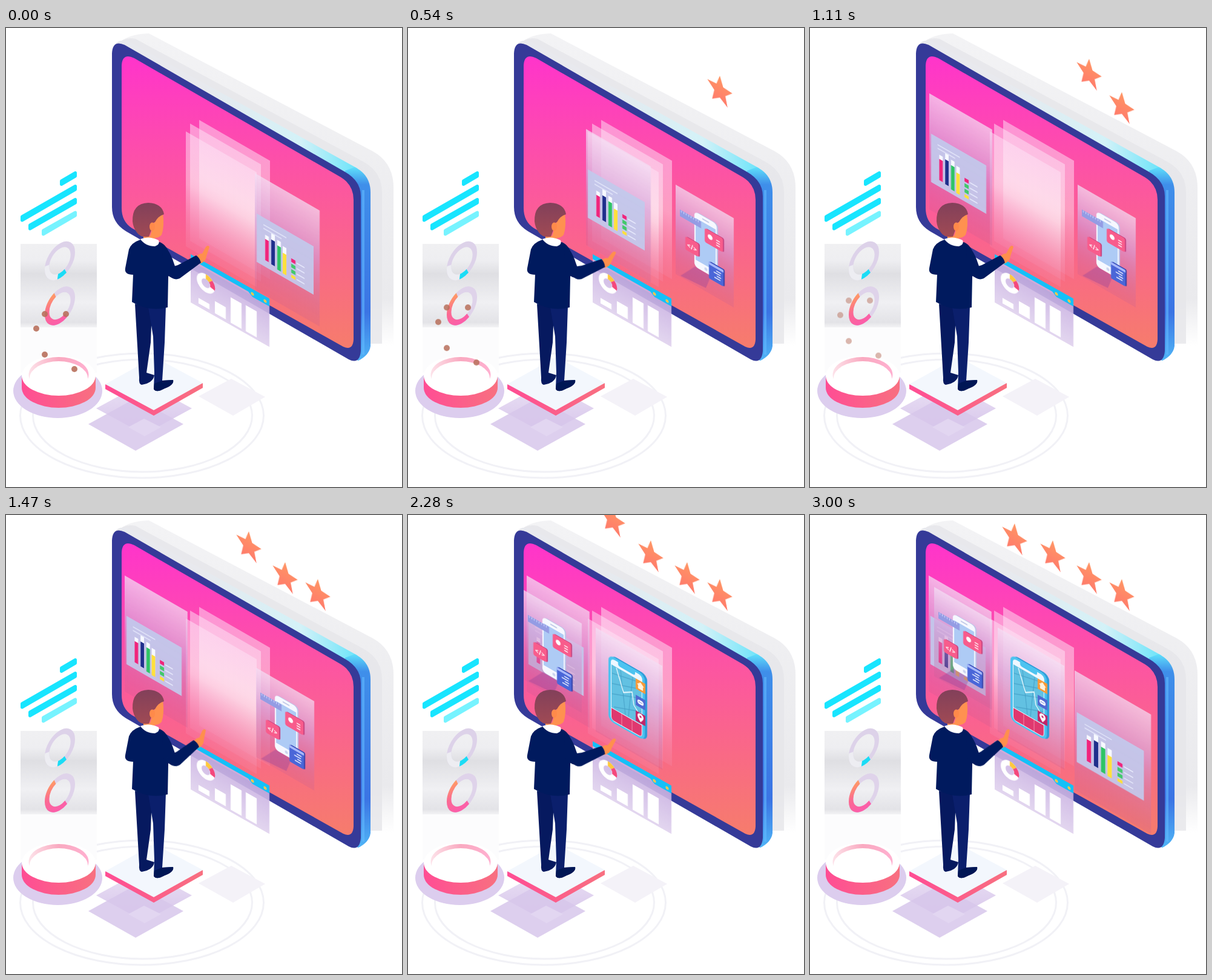
An HTML page for the animation above (3030 ms loop, 654 by 759 pixels).

```html
<!DOCTYPE html>
<html lang="en">
<head>
<meta charset="utf-8">
<title>Isometric dashboard</title>
<style>
  html, body { margin: 0; width: 100%; height: 100%; overflow: hidden; background: #fff; }
  svg { display: block; width: 654px; height: 759px; }
  .move { animation: 3030ms linear infinite; }
  .chart { animation-name: chart; }
  .app { animation-name: app; }
  .phone { animation-name: phone; }
  .next { animation-name: next; }
  .arm { animation-name: arm; transform-origin: 280px 412px; animation-timing-function: ease-in-out; }
  .dots { animation-name: dots; }
  .hop { animation: hop 3030ms var(--s) infinite; }
  .s1 { animation-name: show1; }
  .s2 { animation-name: show2; }
  .s3 { animation-name: show3; }
  .s4 { animation-name: show4; }

  @keyframes chart {
    0% { transform: translate(411px, 240px) skewY(30deg) scaleX(1); animation-timing-function: ease-in-out; }
    14%, 20.5% { transform: translate(294px, 167px) skewY(30deg) scaleX(1); animation-timing-function: ease-in-out; }
    34%, 36.7% { transform: translate(197px, 108px) skewY(30deg) scaleX(.97); }
    43%, 100% { transform: translate(196px, 100px) skewY(30deg) scaleX(.97); }
  }
  @keyframes app {
    0%, 6% { transform: translate(442px, 259px) skewY(30deg); opacity: 0; }
    13% { opacity: 1; }
    45.5% { transform: translate(442px, 259px) skewY(30deg); animation-timing-function: ease-in; }
    48.5% { transform: translate(414px, 253px) skewY(30deg); animation-timing-function: ease-out; }
    57%, 63.5% { transform: translate(316px, 198px) skewY(30deg); animation-timing-function: ease-in-out; }
    75.2% { transform: translate(191px, 124px) skewY(30deg); animation-timing-function: ease-in-out; }
    84%, 100% { transform: translate(205px, 119px) skewY(30deg); opacity: 1; }
  }
  @keyframes phone {
    0%, 55% { transform: translate(420px, 267px) skewY(30deg); opacity: 0; }
    61% { opacity: 1; }
    63.5% { transform: translate(420px, 267px) skewY(30deg); animation-timing-function: ease-in-out; }
    75%, 100% { transform: translate(310px, 186px) skewY(30deg); opacity: 1; }
  }
  @keyframes next {
    0%, 79% { transform: translate(438px, 263px) skewY(30deg) scale(1); opacity: 0; }
    88%, 100% { transform: translate(437px, 257px) skewY(30deg) scale(1.18, 1.03); opacity: 1; }
  }
  @keyframes arm {
    0%, 36.6%, 62.4% { transform: rotate(0); }
    17.8%, 75.3% { transform: rotate(9.5deg); }
    48.5%, 99%, 100% { transform: rotate(-6.5deg); }
  }
  @keyframes dots {
    0% { transform: none; opacity: .9; }
    20% { opacity: .85; }
    36.6% { opacity: .5; }
    46%, 100% { transform: translateY(-28px); opacity: 0; }
  }
  @keyframes hop {
    0% { transform: none; animation-timing-function: cubic-bezier(.39, .575, .565, 1); }
    9.9% { transform: translateY(-32px); animation-timing-function: cubic-bezier(.47, 0, .745, .715); }
    19.8%, 100% { transform: none; }
  }
  @keyframes show1 { 0%, 4% { opacity: 0; } 6%, 100% { opacity: 1; } }
  @keyframes show2 { 0%, 22% { opacity: 0; } 24%, 100% { opacity: 1; } }
  @keyframes show3 { 0%, 44% { opacity: 0; } 46%, 100% { opacity: 1; } }
  @keyframes show4 { 0%, 59.5% { opacity: 0; } 61.5%, 100% { opacity: 1; } }
</style>
</head>
<body>
<svg viewBox="0 0 654 759">
  <defs>
    <linearGradient id="screen" x2="0" y2="1">
      <stop stop-color="#ff34cb"/><stop offset=".45" stop-color="#fc579f"/><stop offset="1" stop-color="#f67c6c"/>
    </linearGradient>
    <linearGradient id="sheet" x2="0" y2="1">
      <stop stop-color="#fde4f6" stop-opacity=".5"/><stop offset=".45" stop-color="#fff" stop-opacity=".4"/>
      <stop offset="1" stop-color="#f0a6cc" stop-opacity=".14"/>
    </linearGradient>
    <linearGradient id="pane" x2="0" y2="1">
      <stop stop-color="#f3dff4" stop-opacity=".72"/><stop offset=".4" stop-color="#d49fd8" stop-opacity=".68"/>
      <stop offset="1" stop-color="#c05a94" stop-opacity=".2"/>
    </linearGradient>
    <linearGradient id="haze" x2="0" y2="1">
      <stop stop-color="#f0f0f2"/><stop offset=".2" stop-color="#eeeef1"/><stop offset=".36" stop-color="#dfdfe3"/>
      <stop offset=".7" stop-color="#f0f0f3"/><stop offset=".94" stop-color="#e3e3e7"/><stop offset="1" stop-color="#f3f3f5"/>
    </linearGradient>
    <linearGradient id="shade" x2="0" y2="1">
      <stop stop-color="#f3f3f5"/><stop offset=".85" stop-color="#eaeaed"/><stop offset="1" stop-color="#fff"/>
    </linearGradient>
    <linearGradient id="lip">
      <stop offset=".35" stop-color="#e8e9ee"/><stop offset=".75" stop-color="#d3f2f8"/><stop offset="1" stop-color="#5fe2fa"/>
    </linearGradient>
    <linearGradient id="side" x2="0" y2="1">
      <stop stop-color="#5fe0fb"/><stop offset=".09" stop-color="#3f8fea"/><stop offset=".75" stop-color="#3b74e4"/><stop offset="1" stop-color="#4fb4f6"/>
    </linearGradient>
    <linearGradient id="rim"><stop stop-color="#ff4d94"/><stop offset="1" stop-color="#f87080"/></linearGradient>
    <linearGradient id="bowl"><stop stop-color="#fde3ea"/><stop offset=".5" stop-color="#f9a9c0"/><stop offset="1" stop-color="#ffb0d0"/></linearGradient>
    <linearGradient id="lilac" x2="0" y2="1"><stop stop-color="#ebe2f5"/><stop offset="1" stop-color="#d6c4ea"/></linearGradient>
    <linearGradient id="stats" x2="0" y2="1"><stop stop-color="#c9b0e2" stop-opacity=".9"/><stop offset="1" stop-color="#e0d2ee" stop-opacity=".9"/></linearGradient>
    <linearGradient id="star" x2="0" y2="1"><stop stop-color="#ff9664"/><stop offset="1" stop-color="#ff7b6b"/></linearGradient>
    <linearGradient id="arc" x2="0" y2="1"><stop stop-color="#ff9a66"/><stop offset=".5" stop-color="#fb6a92"/><stop offset="1" stop-color="#fb5fa8"/></linearGradient>
    <linearGradient id="hair" x2="0" y2="1"><stop stop-color="#82405a"/><stop offset="1" stop-color="#a04a54"/></linearGradient>

    <polygon id="starShape" fill="url(#star)" transform="matrix(.87 .5 0 1 0 0)"
      points="0,-25 6.500,-9 23.8,-7.7 10.5,3.4 14.7,20.2 0,11 -14.7,20.2 -10.5,3.4 -23.8,-7.7 -6.5,-9"/>

    <g id="chartPane">
      <rect width="107" height="192" fill="url(#pane)"/>
      <rect x="3" y="65" width="94" height="80" fill="#c3c9ec" opacity=".92"/>
      <path d="M14 77h38M14 83h30" stroke="#e6eafc" stroke-width="1.3"/>
      <path d="M17 92h6v42h-6zM27 84h6v50h-6zM37 89h6v45h-6zM46 94h6v40h-6z" fill="#f7f9ff"/>
      <path d="M17 99h6v35h-6z" fill="#f0247c"/>
      <path d="M27 94h6v41h-6z" fill="#1f2f8c"/>
      <path d="M37 98h6v40h-6z" fill="#2fc465"/>
      <path d="M46 105h6v34h-6z" fill="#ffe03c"/>
      <path d="M60 106h7v6h-7z" fill="#f0247c"/>
      <path d="M60 115h7v6h-7zM60 124h7v6h-7z" fill="#42c96c"/>
      <path d="M60 133h7v5h-7z" fill="#ffe03c"/>
      <path d="M69 109h13M69 118h13M69 127h13M69 136h13" stroke="#eef1ff" stroke-width="1.3"/>
    </g>

    <g id="appPane">
      <rect width="96" height="148" fill="url(#pane)"/>
      <path d="M8 146L32 117 58 118 50 142Z" fill="#8e3f9c" opacity=".35"/>
      <rect x="33" y="25" width="37" height="91" rx="6" fill="#b9c3e8"/>
      <rect x="31" y="26" width="37" height="91" rx="6" fill="#f6f8ff"/>
      <rect x="33" y="36" width="33" height="69" fill="#aecbf5"/>
      <path d="M44 31h11" stroke="#c0c9e6" stroke-width="2"/>
      <circle cx="50" cy="111" r="2.5" fill="#ccd4ee"/>
      <rect x="7" y="37" width="35" height="11" fill="#949ce4"/>
      <path d="M9 39h32" stroke="#dfe3ff" stroke-width="3" stroke-dasharray="1 3"/>
      <rect x="50" y="43" width="30" height="23" rx="3" fill="#c84480"/>
      <rect x="48" y="44" width="30" height="23" rx="3" fill="#f85c8c"/>
      <circle cx="57" cy="54" r="4" fill="#fff"/>
      <path d="M67 53h6M67 57h6M67 61h6" stroke="#fff" stroke-width="1.3"/>
      <rect x="18" y="75" width="22" height="22" rx="3" fill="#c84480"/>
      <rect x="16" y="76" width="22" height="22" rx="3" fill="#f85c8c"/>
      <text x="27" y="91" font-family="Inter, sans-serif" font-size="9.5" font-weight="700" fill="#fff" text-anchor="middle">&lt;/&gt;</text>
      <rect x="57" y="94" width="24" height="28" rx="2" fill="#3340a8"/>
      <rect x="55" y="95" width="24" height="28" rx="2" fill="#4a66d8"/>
      <path d="M55 98h24" stroke="#a7b8fa" stroke-width="4"/>
      <path d="M67 104h8M63 108h11M68 112h7M64 116h10" stroke="#fff" stroke-width="1.5"/>
    </g>

    <g id="phonePane">
      <rect width="110" height="172" fill="url(#pane)"/>
      <rect x="25" y="30" width="60" height="109" rx="9" fill="#2f9cd8"/>
      <rect x="21" y="32" width="60" height="109" rx="9" fill="#4cc3f0"/>
      <rect x="25" y="36" width="52" height="102" rx="6" fill="#eef7ff"/>
      <path d="M37 35h28v4q0 3-4 3H41q-4 0-4-3z" fill="#4cc3f0"/>
      <path d="M26 46h50v71H26z" fill="#62c1e2"/>
      <path d="M27 60l48-12M27 77l48-18M27 94l48-20M30 114l45-18M41 47l8 69M61 47l-7 69" stroke="#459fc6"/>
      <path d="M34 47l12 34 14-9 3 20 13 14" fill="none" stroke="#f2fbff" stroke-width="1.5"/>
      <path d="M26 118h50v14q0 5-5 5H31q-5 0-5-5z" fill="#e0386f"/>
      <path d="M43 118v19M60 118v19" stroke="#f58aaa"/>
      <path d="M66 46h16v17H66z" fill="#f99a37"/>
      <path d="M74 48l6 6h-2v6h-8v-6h-2z" fill="#fff3df"/>
      <path d="M66 73h16v17H66z" fill="#5068d2"/>
      <rect x="69" y="78" width="10" height="7" rx="3.500" fill="#fff"/>
      <path d="M71 81.500h6" stroke="#5068d2" stroke-width="1.5" stroke-dasharray="1.5 1"/>
      <path d="M66 99h16v17H66z" fill="#c32468"/>
      <path d="M74 114q-5-6-5-9a5 5 0 0 1 10 0q0 3-5 9z" fill="#fff"/>
      <circle cx="74" cy="105" r="1.8" fill="#c32468"/>
    </g>
  </defs>

  <!-- floor -->
  <g fill="none" stroke="#f1f1f6" stroke-width="3">
    <ellipse cx="224.500" cy="641" rx="201" ry="103"/>
    <ellipse cx="225.500" cy="641" rx="181" ry="93"/>
  </g>
  <path d="M318 609L372 580 428 610 375 641Z" fill="#f4f2f8"/>

  <!-- monitor -->
  <path d="M184 28Q198 10 236 9L606 204Q640 223 640 264V525H590V260Z" fill="url(#shade)"/>
  <path d="M184 28Q194 14 214 18L590 221Q621 238 621 272V522H590V260Z" fill="#e6e6ea" opacity=".8"/>
  <path d="M178 30Q186 16 204 23L580 232 590 260 560 250Z" fill="url(#lip)"/>
  <path d="M560 236L576 230Q602 243 602 272V526Q600 541 582 550L570 546Z" fill="url(#side)"/>
  <path d="M590 268V540" stroke="#62baff" stroke-width="4" opacity=".6"/>
  <path d="M175 42Q176 19 196 28L560 238Q586 253 586 278V534Q584 557 566 548L198 336Q175 322 175 296Z" fill="#353a98"/>
  <path d="M191 62Q192 40 212 50L550 245Q574 258 574 284V515Q573 534 557 527L208 331Q191 320 191 298Z" fill="url(#screen)"/>

  <!-- stacked sheets -->
  <g fill="url(#sheet)">
    <rect width="117" height="196" transform="matrix(1 .577 0 1 319 152)"/>
    <rect width="117" height="194" transform="matrix(1 .577 0 1 304 158)"/>
    <rect width="117" height="190" transform="matrix(1 .577 0 1 297 171)"/>
  </g>

  <g class="move chart"><use href="#chartPane"/></g>
  <g class="move app"><use href="#appPane"/></g>
  <g class="move phone"><use href="#phonePane"/></g>
  <g class="move next"><use href="#chartPane"/></g>

  <!-- statistics under the screen -->
  <g transform="matrix(1 .565 0 1 305 374)">
    <rect y="8" width="130" height="72" fill="url(#stats)"/>
    <path d="M0 0H130V13H102L95 8H0Z" fill="#14c0f8"/>
    <circle cx="102" cy="8" r="2.5" fill="#ffc64a"/>
    <circle cx="123" cy="8" r="2.5" fill="#ffc64a"/>
    <g fill="none" stroke-width="8" transform="translate(25 34)">
      <circle r="11" stroke="#fff"/>
      <path d="M0-11A11 11 0 0 1 8-7.500" stroke="#ffc83c"/>
      <path d="M8-7.500A11 11 0 0 1 11 3" stroke="#f4487c"/>
    </g>
    <path d="M13 65h18v9H13zM40 55h18v20H40zM66 34h18v42H66zM91 33h18v43H91z" fill="#fff"/>
  </g>

  <!-- cyan bars -->
  <g fill="#18e5ff" stroke="#18e5ff" stroke-width="5" stroke-linejoin="round">
    <path d="M91.500 253L114.500 239.500V245L91.500 258.500Z"/>
    <path d="M26.500 312L114.500 261.500V267L26.500 318Z"/>
    <path d="M39.500 326L114.500 283.500V289L39.500 332Z"/>
    <path d="M61.500 335L114.500 305V310L61.500 341Z" fill="#76f3ff" stroke="#76f3ff"/>
  </g>

  <!-- rings and bowl -->
  <rect x="24" y="357" width="126" height="138" fill="url(#haze)"/>
  <rect x="24" y="495" width="126" height="75" fill="#fcfcfd"/>
  <g fill="none" stroke-width="8.500">
    <g transform="matrix(.87 -.5 0 1 89 385)">
      <circle r="24.500" stroke="#ddd2e9"/>
      <circle r="24.500" stroke="#ededf2" pathLength="360" stroke-dasharray="120 240" stroke-dashoffset="-70"/>
      <circle r="24.500" stroke="#1bdcf5" pathLength="360" stroke-dasharray="36 324" stroke-dashoffset="-64"/>
    </g>
    <g transform="matrix(.87 -.5 0 1 89 459.500)">
      <circle r="24.500" stroke="#dfd3ea"/>
      <circle r="24.500" stroke="url(#arc)" pathLength="360" stroke-dasharray="187 173" stroke-dashoffset="-61"/>
    </g>
  </g>
  <ellipse cx="85.500" cy="600" rx="73.500" ry="45" fill="#dccdee"/>
  <path d="M26 577V595A61 33 0 0 0 148 595V577Z" fill="url(#rim)"/>
  <ellipse cx="87" cy="575" rx="61" ry="33" fill="#fff"/>
  <ellipse cx="87" cy="573" rx="49.500" ry="29" fill="url(#bowl)"/>
  <ellipse cx="87" cy="579" rx="48" ry="28" fill="#fff"/>
  <g class="move dots" fill="#b8705c">
    <circle cx="64" cy="473" r="5"/><circle cx="99" cy="473" r="5"/><circle cx="50" cy="497" r="5"/>
    <circle cx="64" cy="540" r="5"/><circle cx="113" cy="564" r="5"/>
  </g>

  <!-- platform -->
  <path d="M149 629L228 586 307 629 228 672Z" fill="url(#lilac)"/>
  <path d="M136 655L214 612 293 655 214 699Z" fill="#d8c7ec" opacity=".85"/>
  <path d="M202 660L228 646 256 660 229 675Z" fill="#e2d6f1"/>
  <path d="M164 589V597L244 641 325 595V587L244 620Z" fill="url(#rim)"/>
  <path d="M164 589L245 544 325 587 244 632Z" fill="#f3f7fd"/>

  <!-- person -->
  <path d="M213 456L241 464 239 520 232 570 245 574Q243 587 224 590 219 589 220 578Z" fill="#06195f"/>
  <path d="M235 462L264 460 262 520 258 583 276 582Q278 590 262 596 248 604 244 597L245 570 243 510Z" fill="#0b1f6c"/>
  <path d="M245 588L258 583 276 582Q278 590 262 596 248 604 244 597Z" fill="#001655"/>
  <path d="M259 306Q262 328 257 342 253 347 246 347L247 357 228 353 226 340 238 344 246 318Z" fill="#ff9150"/>
  <path d="M222 350Q236 362 254 354 268 360 271 380L268 412 267 462Q236 470 208 453L210 408Q195 408 197 397L203 366Q207 355 222 350Z" fill="#001a5e"/>
  <path d="M258 358Q270 366 277 388L285 411Q272 418 260 402Z" fill="#001a5e"/>
  <path d="M222 349Q236 343 252 351 255 358 246 361 230 361 222 349Z" fill="#fff"/>
  <path d="M209 320Q208 290 235 289 258 290 261 308 251 311 246 321 238 323 240 334L236 345Q222 347 216 338 210 330 209 320Z" fill="url(#hair)"/>
  <ellipse cx="241.500" cy="328.500" rx="4.500" ry="7" fill="#ff8a4a"/>
  <g class="move arm">
    <path d="M313 380Q318 372 324 373L330 362Q334 358 336 362L331 377Q331 386 320 390Z" fill="#ff8f4c"/>
    <path d="M268 397L284 392 314 376Q320 380 322 388L287 414Q276 419 266 406Z" fill="#001a5e"/>
  </g>

  <!-- rating -->
  <g class="move s1"><g class="hop" style="--s:130ms"><use href="#starShape" transform="translate(515 131)"/></g></g>
  <g class="move s2"><g class="hop" style="--s:700ms"><use href="#starShape" transform="translate(461 103)"/></g></g>
  <g class="move s3"><g class="hop" style="--s:1380ms"><use href="#starShape" transform="translate(401 67)"/></g></g>
  <g class="move s4"><g class="hop" style="--s:1900ms"><use href="#starShape" transform="translate(338 39)"/></g></g>
</svg>
</body>
</html>
```
